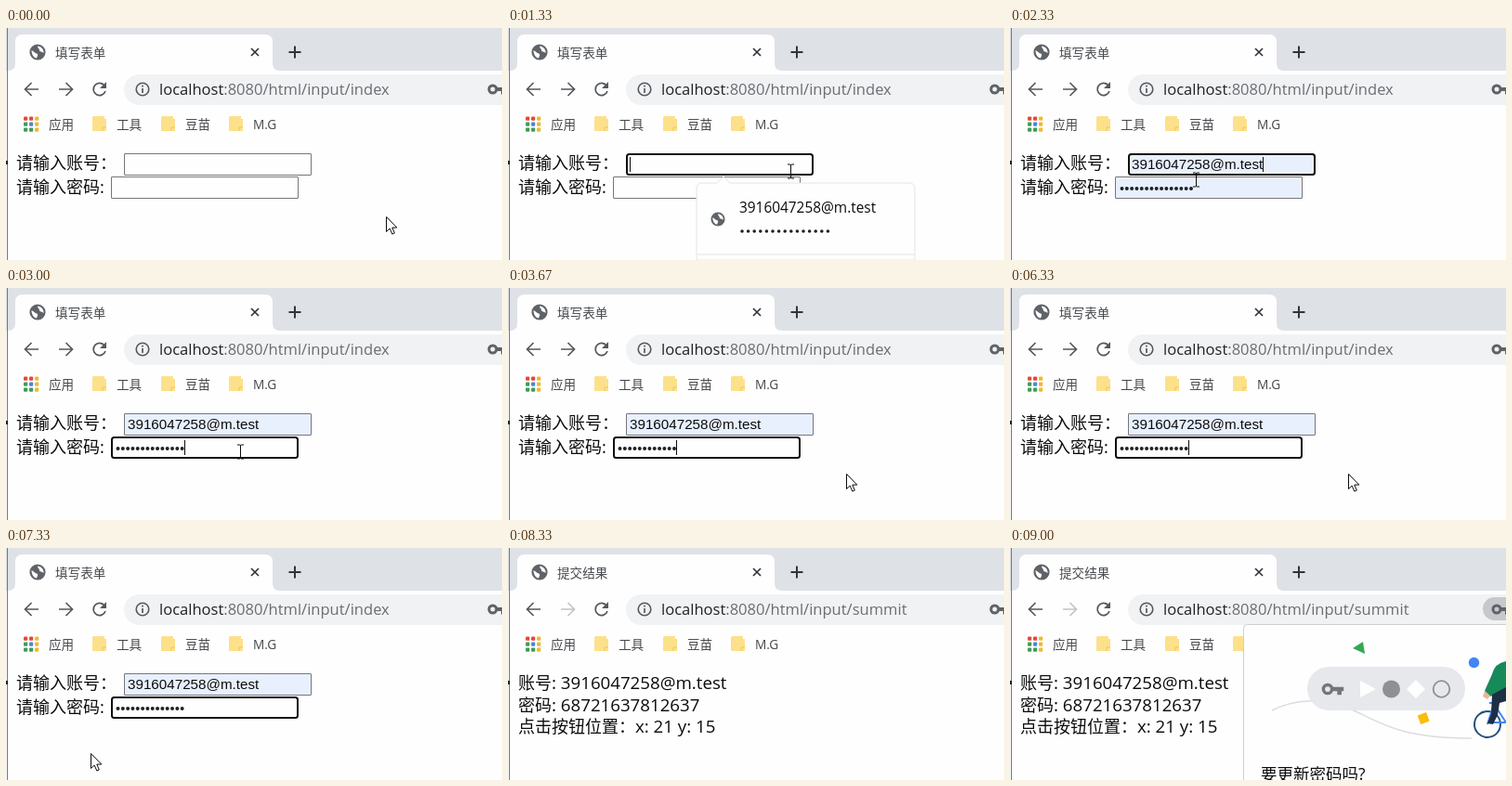
An HTML page that plays this animation: 534 by 250 pixels, repeating every 9.33 s.

```html
<!DOCTYPE html>
<html lang="zh-CN">
<head>
<meta charset="utf-8">
<title>填写表单</title>
<style>
html, body { margin: 0; width: 100%; height: 100%; overflow: hidden; background: #fefefe; }
svg { display: block; width: 534px; height: 250px; }
text { font-family: "Open Sans", "Noto Sans CJK SC", "Noto Sans CJK", sans-serif; fill: #0c0c0e; white-space: pre; }
.ui { font-size: 13.6px; fill: #45484c; }
.url { font-size: 16.55px; fill: #6a6d72; }
.url tspan { fill: #202124; }
.page { font-size: 18px; }
.latin { font-size: 18.7px; }
.field { font: 15.2px "Liberation Sans", Arial, sans-serif; }
.line { fill: none; stroke: #55585d; stroke-width: 1.7; }
</style>
</head>
<body>
<svg viewBox="0 0 534 250">
  <defs>
    <g id="globe">
      <circle r="8.6" fill="#5f6368"/>
      <path d="M-6.5-2C-4-1-3 1-1 1.500C1 2 0 4-1 6.500C-4 6-6.500 3-6.500-2ZM0-6.500C0-4 2-4 2-2C2 0 5-1 6.500 1C7-3 4-6 0-6.500Z" fill="#fefefe"/>
    </g>
    <g id="folder">
      <path d="M0 1.500Q0 0 1.500 0H13V3H15V16H0Z" fill="#fde08a"/>
      <path d="M11 16V12H15" fill="none" stroke="#ecc766"/>
    </g>
    <g id="key">
      <path d="M3.500-2H15V2H13V5.500H9V2H3.500Z" fill="#5f6368"/>
      <circle r="4" fill="none" stroke="#5f6368" stroke-width="3"/>
    </g>
  </defs>

  <rect width="534" height="250" fill="#fefefe"/>
  <rect width="534" height="46" fill="#dee1e6"/>
  <path d="M2 46Q10 46 10 38V15Q10 7 18 7H279Q287 7 287 15V38Q287 46 295 46Z" fill="#fefefe"/>
  <path d="M1.500 0V250" stroke="#75787c"/>
  <path d="M0 143H2V147H0Z" fill="#202124"/>
  <use href="#globe" x="34" y="26"/>
  <text class="ui" id="title" x="53" y="31.500"></text>
  <path class="line" d="M264 22L272 30M272 22L264 30" style="stroke:#30343c"/>
  <path class="line" d="M304.500 26H317.500M311 19.500V32.500" style="stroke:#30343c;stroke-width:2"/>

  <path class="line" d="M35 66H21M27.500 59L20.500 66L27.500 73"/>
  <path class="line" id="forward" d="M57 66H71M64.500 59L71.500 66L64.500 73"/>
  <path class="line" d="M106 62A6.600 6.600 0 1 0 107 68"/>
  <path d="M108 58V65H101Z" fill="#55585d"/>
  <rect x="127" y="50" width="430" height="33" rx="16.500" fill="#f0f2f4"/>
  <circle class="line" cx="147" cy="66" r="6.800" style="stroke-width:1.600"/>
  <path class="line" d="M147 65V70M147 61.700V63.500"/>
  <text class="url" x="165" y="71.500"><tspan>localhost</tspan>:8080/html/input/<tspan id="file" style="fill:inherit"></tspan></text>
  <rect id="keyPill" x="509" y="53" width="60" height="25" rx="12.500" fill="#c6c8cc"/>
  <use href="#key" x="524" y="66"/>

  <g id="apps"></g>
  <text class="ui" x="46" y="108.500">应用</text>
  <use href="#folder" x="93" y="95"/>
  <text class="ui" x="119" y="108.500">工具</text>
  <use href="#folder" x="167" y="95"/>
  <text class="ui" x="193" y="108.500">豆苗</text>
  <use href="#folder" x="240" y="95"/>
  <text class="ui" x="266" y="108.500">M.G</text>

  <g id="form">
    <text class="page" x="11" y="152">请输入账号：</text>
    <text class="page" x="11" y="178">请输入密码:</text>
    <rect id="userBox"/>
    <rect id="passBox"/>
    <text class="field mail" id="user" x="131" y="152"></text>
    <g id="dots"></g>
    <path id="caret" stroke="#0c0c0e"/>
    <g id="suggest">
      <path d="M209 167H225L232 160L239 167H432Q438 167 438 173V250H203V173Q203 167 209 167Z" fill="#fefefe" stroke="#e2e4ea"/>
      <rect id="hover" x="204" y="176" width="234" height="60" fill="#eeeff1"/>
      <use href="#globe" transform="translate(226 206) scale(.88)"/>
      <text class="mail" x="249" y="199" font-size="15.400"></text>
      <g id="hint"></g>
      <path d="M204 244H438" stroke="#e2e4ea"/>
    </g>
  </g>

  <g id="result">
    <text class="page" x="11" y="152">账号<tspan class="latin">: <tspan class="mail"></tspan></tspan></text>
    <text class="page" x="11" y="176">密码<tspan class="latin">: 68721637812637</tspan></text>
    <text class="page" x="11" y="199">点击按钮位置：<tspan class="latin">x: 21 y: 15</tspan></text>
  </g>

  <g id="bubble">
    <rect x="251.500" y="82.500" width="300" height="180" rx="4" fill="#fefefe" stroke="#cdd0d5"/>
    <path d="M282 175C305 163 335 162 358 170C395 184 410 205 497 205" fill="none" stroke="#dadce0" stroke-width="1.500"/>
    <rect x="320" y="128" width="170" height="47" rx="23.500" fill="#e6e8ec"/>
    <use href="#key" transform="translate(342 152) scale(1.150)" opacity=".85"/>
    <path d="M377 143L394 152L377 161ZM437 142L447 152L437 162L427 152Z" fill="#fefefe"/>
    <circle cx="410.500" cy="152" r="9.500" fill="#8d9196"/>
    <circle cx="464.500" cy="152" r="8.800" fill="none" stroke="#8d9196" stroke-width="1.800"/>
    <path d="M369 108L380 101L382 114Z" fill="#34a853"/>
    <circle cx="499.500" cy="123.500" r="5.700" fill="#4285f4"/>
    <rect x="440" y="178.500" width="10" height="10" transform="rotate(-20 445 183)" fill="#fbbc04"/>
    <g fill="none" stroke="#26507c" stroke-width="2">
      <circle cx="514" cy="190" r="14"/>
      <path d="M514 190L521 168L534 188H514M516 167H524" stroke="#4285f4"/>
    </g>
    <path d="M534 122Q522 124 519 136L511 154L517 160L534 153Z" fill="#168a58"/>
    <path d="M534 150L519 158L518 179L514 189L520 190L525 180L527 167L534 165Z" fill="#1d2f45"/>
    <path d="M511 154L509 160L514 163L517 159Z" fill="#e9b49a"/>
    <text x="270" y="250" font-size="17.500">要更新密码吗?</text>
  </g>

  <g id="cursor">
    <path id="arrow" d="M0 0V16L3.700 12.600L6.300 18.600L8.800 17.500L6.300 11.600H11.300Z" fill="#fefefe" stroke="#0c0c0e"/>
    <path id="beam" d="M-3.500-7.500H-1Q0-7.500 0-6.500V6.500Q0 7.500-1 7.500H-3.500M3.500-7.500H1Q0-7.500 0-6.500V6.500Q0 7.500 1 7.500H3.500" fill="none" stroke="#0c0c0e"/>
    <path id="hand" d="M0 1Q0-.500 1.500-.500T3 1V7L11 9V14L9 19H2L-4 11L-3 9.500L0 12Z" fill="#fefefe" stroke="#0c0c0e"/>
  </g>
</svg>
<script>
const LOOP = 9330, STEP = 1000 / 3;
const MAIL = '3916047258@m.test';
const $ = id => document.getElementById(id);
const show = (id, on) => { $(id).style.display = on ? '' : 'none'; };

// Each row holds from its step on: step, pointer, x, y, focus, dots, extras
// extras: m mail filled, t password tinted, c caret, p suggestions, h hovered, r result, b bubble
const TABLE = [
  [0, 'arrow', 409.5, 203.5, '', 0, ''],
  [2, 'arrow', 365, 182, '', 0, ''],
  [3, 'beam', 316, 157, '', 0, ''],
  [4, 'beam', 304.5, 154.5, 'user', 0, 'cp'],
  [5, 'arrow', 270, 205, 'user', 15, 'mtph'],
  [6, 'arrow', 236, 192, 'user', 15, 'mtc'],
  [7, 'beam', 200.5, 163.5, 'user', 15, 'mtc'],
  [8, 'beam', 203.5, 172.5, 'pass', 15, 'mtc'],
  [9, 'beam', 252.5, 176.5, 'pass', 14, 'mc'],
  [10, 'arrow', 364.5, 200.5, 'pass', 13, 'mc'],
  [11, 'arrow', 364.5, 200.5, 'pass', 12, 'mc'],
  [12, 'arrow', 364.5, 200.5, 'pass', 13, 'mc'],
  [13, 'arrow', 364.5, 200.5, 'pass', 14, 'mc'],
  [14, 'arrow', 364.5, 200.5, 'pass', 15, 'mc'],
  [15, 'arrow', 364.5, 200.5, 'pass', 16, 'mc'],
  [16, 'arrow', 364.5, 200.5, 'pass', 16, 'm'],
  [18, 'arrow', 364.5, 200.5, 'pass', 15, 'mc'],
  [19, 'arrow', 364.5, 200.5, 'pass', 14, 'mc'],
  [20, 'arrow', 364.5, 200.5, 'pass', 14, 'm'],
  [21, 'arrow', 230, 212, 'pass', 14, 'mc'],
  [22, 'arrow', 91.5, 221.5, 'pass', 14, 'm'],
  [23, 'hand', 33, 201, 'pass', 14, 'm'],
  [25, '', 0, 0, '', 0, 'r'],
  [26, '', 0, 0, '', 0, 'rb']
];

const circles = (n, x, gap, y, r) => Array.from({ length: n }, (_, i) =>
  `<circle cx="${x + i * gap}" cy="${y}" r="${r}" fill="#202124"/>`).join('');

$('dots').innerHTML = circles(16, 120.5, 5.32, 173, 2);
$('hint').innerHTML = circles(15, 252, 6.6, 219, 1.8);
document.querySelectorAll('.mail').forEach(el => { el.textContent = MAIL; });

const [red, green, blue, amber] = ['#e24a3b', '#3f9d56', '#4a86dc', '#f0b92c'];
$('apps').innerHTML = [red, red, amber, green, blue, amber, green, green, amber].map((c, i) =>
  `<rect x="${19 + i % 3 * 6}" y="${95.5 + Math.floor(i / 3) * 6}" width="4.2" height="4.2" rx="1" fill="${c}"/>`).join('');

function box(id, x, y, focused, tinted) {
  const inset = focused ? 1 : 0.5;
  const attrs = {
    x: x + inset, y: y + inset, width: 202 - 2 * inset, height: 24 - 2 * inset,
    rx: focused ? 2.5 : 0.5, fill: tinted ? '#e8f0fe' : '#fefefe',
    stroke: focused ? '#101010' : '#767676', 'stroke-width': 2 * inset
  };
  for (const key in attrs) $(id).setAttribute(key, attrs[key]);
}

function draw([, pointer, x, y, focus, dots, extras]) {
  const has = c => extras.includes(c);
  const done = has('r');
  $('title').textContent = done ? '提交结果' : '填写表单';
  $('file').textContent = done ? 'summit' : 'index';
  $('forward').style.stroke = done ? '#c2c4c8' : '';
  show('form', !done);
  show('result', done);
  show('bubble', has('b'));
  show('keyPill', has('b'));
  show('suggest', has('p'));
  show('hover', has('h'));
  show('user', has('m'));
  show('caret', has('c'));

  box('userBox', 127, 135, focus === 'user', has('m'));
  box('passBox', 113, 160, focus === 'pass', has('t'));
  [...$('dots').children].forEach((dot, i) => { dot.style.display = i < dots ? '' : 'none'; });

  const inUser = focus === 'user';
  const textEnd = has('m') ? 131 + $('user').getComputedTextLength() : 131;
  const caretX = Math.round(inUser ? textEnd : 117.5 + dots * 5.32) + 0.5;
  $('caret').setAttribute('d', `M${caretX} ${inUser ? 139 : 164}v16`);

  show('cursor', pointer);
  for (const id of ['arrow', 'beam', 'hand']) show(id, id === pointer);
  $('cursor').setAttribute('transform', `translate(${x} ${y})`);
}

const start = performance.now();
let current;
function tick() {
  const t = (performance.now() - start) % LOOP;
  const step = Math.floor((t + 6) / STEP);
  const row = TABLE.findLast(r => r[0] <= step);
  if (row !== current) draw(current = row);
  requestAnimationFrame(tick);
}
tick();
</script>
</body>
</html>
```
